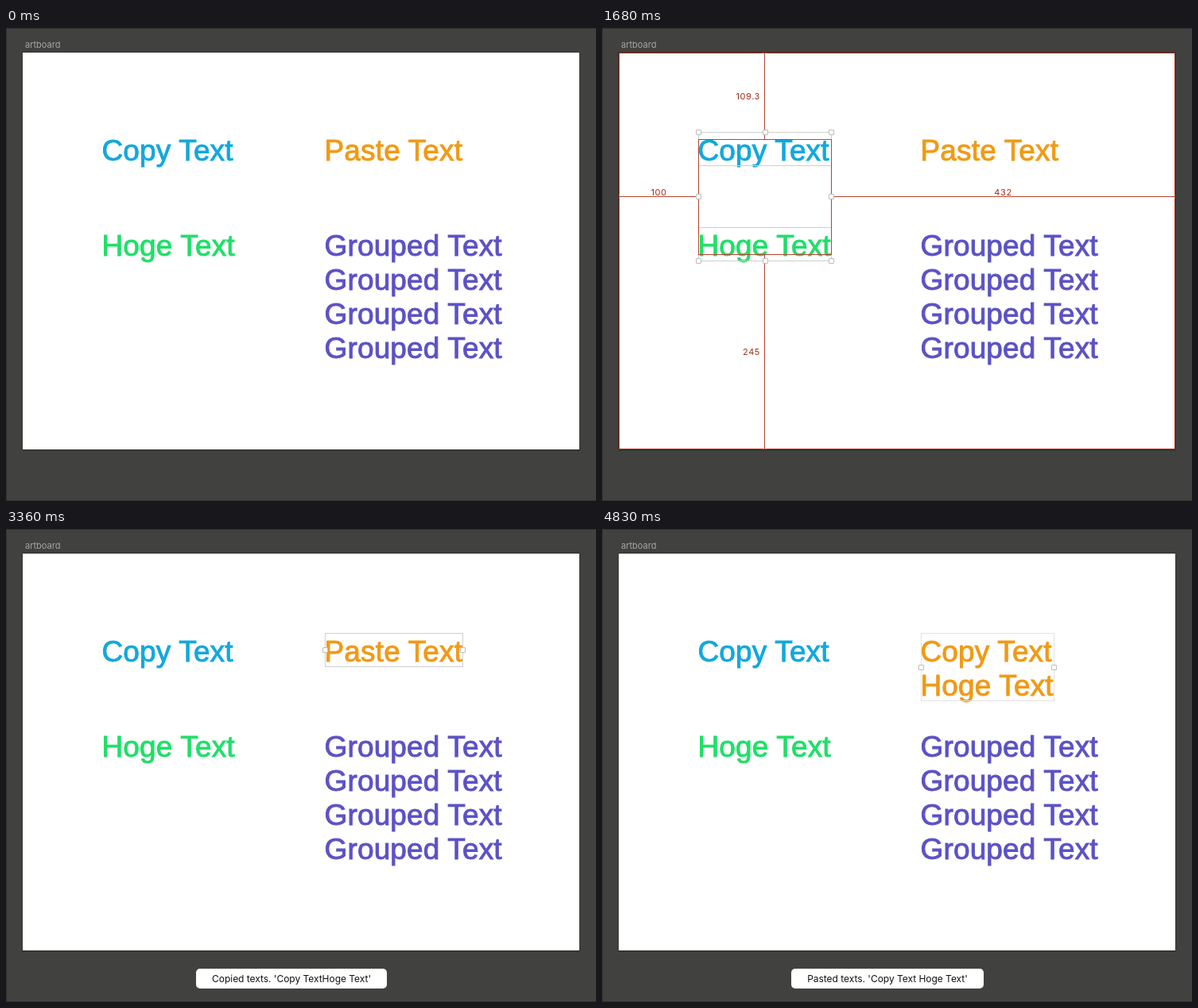
These frames come from a looping animation (742x596 px, 4900 ms). An HTML page:

```html
<!DOCTYPE html>
<html lang="en">
<head>
<meta charset="utf-8">
<style>
  html, body { margin: 0; width: 742px; height: 596px; overflow: hidden; background: #41413f; }
  svg { display: block; }
  text { white-space: pre; }
  .big { font: 37px "Liberation Sans", Arial, sans-serif; letter-spacing: .15px; stroke: currentColor; stroke-width: .95px; fill: currentColor; }
  .label, .measure { font: 11px Inter, sans-serif; }
  .label { fill: #a6a6a4; }
  .measure { fill: #a52a16; letter-spacing: .6px; }
  .toast { font: 12px Inter, sans-serif; letter-spacing: -.03px; fill: #111; text-anchor: middle; }
  .red { stroke: #b5442f; fill: none; }
  .edge { stroke: #a02814; fill: none; }
  .grey { stroke: #cfcfcf; fill: none; }
  .faint { stroke: #e2e2e2; fill: none; }
  .handle { fill: #fff; stroke: #bdbdbd; }
  .marquee { fill: #fff; fill-opacity: .08; stroke: #d2d2d2; }
</style>
</head>
<body>
<svg width="742" height="596" viewBox="0 0 742 596">
  <rect width="742" height="596" fill="#41413f"/>
  <path d="M0 .5H742M.5 0V596M0 595.5H742" stroke="#30302f"/>
  <text class="label" x="24" y="25">artboard</text>
  <rect x="20" y="30" width="702" height="503" fill="#353533"/>
  <rect x="21" y="31" width="700" height="500" fill="#fff"/>
  <g class="big">
    <text x="120.5" y="166.5" color="#13a8dc">Copy Text</text>
    <text x="120.5" y="286.5" color="#20df69">Hoge Text</text>
    <g id="paste"></g>
    <g id="grouped" color="#5c52c5"></g>
  </g>
  <g id="overlay"></g>
</svg>
<script>
const LOOP = 4900, STEP = 70;
const ART = { x0: 21, y0: 31, x1: 720, y1: 530 };
const TIME = {
  dragStart: 280, dragEnd: 770, release: 910,
  copyKeys: 1540, copied: 2030, copyKeysUp: 2170,
  hover: 2800, click: 3080,
  pasteKeys: 3500, pasted: 4060, pasteKeysUp: 4620
};
const $ = id => document.getElementById(id);
const box = (x0, y0, x1, y1) => ({ x0, y0, x1, y1 });
const mid = (a, b) => Math.round((a + b) / 2);

const rect = (b, cls) =>
  `<rect class="${cls}" x="${b.x0 + .5}" y="${b.y0 + .5}" width="${b.x1 - b.x0}" height="${b.y1 - b.y0}"/>`;
const text = (x, y, str, cls = "", extra = "") =>
  `<text class="${cls}" x="${x}" y="${y}" ${extra}>${str}</text>`;
const lines = (x, strings, y) => strings.map((s, i) => text(x, y + 43 * i, s)).join("");
const handle = (x, y) =>
  `<rect class="handle" x="${x - 2.5}" y="${y - 2.5}" width="6" height="6" rx=".5"/>`;

function handles(b, all) {
  const xs = [b.x0, mid(b.x0, b.x1), b.x1], ys = [b.y0, mid(b.y0, b.y1), b.y1];
  let out = "";
  xs.forEach((x, i) => ys.forEach((y, j) => {
    if (all ? i !== 1 || j !== 1 : i !== 1 && j === 1) out += handle(x, y);
  }));
  return out;
}

// Distances from box b to the artboard edges: top, bottom, left, right.
function measure(b, cx, cy, [top, bottom, left, right]) {
  const x = cx + .5, y = cy + .5;
  const tickX = [ART.y0, b.y0, b.y1, ART.y1].map(v => `M${x - 3} ${v + .5}h6`).join("");
  const tickY = [ART.x0, b.x0, b.x1, ART.x1].map(v => `M${v + .5} ${y - 3}v6`).join("");
  const vertical = (a, c, s) => text(cx - 5, (a + c) / 2 + 4.5, s, "measure", 'text-anchor="end"');
  const horizontal = (a, c, s) => text((a + c) / 2 + .5, cy - 1, s, "measure", 'text-anchor="middle"');
  return rect(ART, "edge") + rect(b, "red") +
    `<path class="red" d="M${x} ${ART.y0}V${b.y0}M${x} ${b.y1}V${ART.y1}M${ART.x0} ${y}H${b.x0}M${b.x1} ${y}H${ART.x1}${tickX}${tickY}"/>` +
    vertical(ART.y0, b.y0, top) + vertical(b.y1, ART.y1, bottom) +
    horizontal(ART.x0, b.x0, left) + horizontal(b.x1, ART.x1, right);
}

function toast(str, width, opacity) {
  return `<g opacity="${opacity}"><rect x="${359 - width / 2}" y="554" width="${width}" height="25" rx="5" fill="#fff"/>` +
    text(359, 571, str, "toast") + "</g>";
}

function leftSelection(t) {
  const p = Math.min(1, (t - TIME.dragStart) / (TIME.dragEnd - TIME.dragStart));
  const k = p * p * (3 - 2 * p);
  const drag = box(75, 94, Math.round(75 + 188 * k), Math.round(94 + 293 * k));
  const copy = box(121, 131, 288, 173), hoge = box(121, 251, 288, 293);
  const both = box(121, 131, 288, 293);
  const reaches = b => drag.x1 > b.x0 && drag.y1 > b.y0;
  let out = "", grips = "";
  if (t < TIME.release) out += rect(drag, "marquee");
  if (reaches(hoge)) {
    out += rect(copy, "grey") + rect(hoge, "grey") + rect(both, "grey");
    grips = handles(both, true);
  } else if (reaches(copy)) {
    out += rect(copy, "grey");
    grips = handles(copy, false);
  }
  if (t >= TIME.copyKeys && t < TIME.copyKeysUp)
    out += measure(box(121, 140, 288, 285), 204, 212, ["109.3", "245", "100", "432"]);
  return out + grips;
}

function rightSelection(t) {
  const pasted = t >= TIME.pasted;
  const frame = pasted ? box(401, 131, 568, 216) : box(401, 131, 574, 173);
  let out = rect(frame, pasted ? "faint" : "grey");
  if (t >= TIME.pasteKeys && t < TIME.pasteKeysUp)
    out += pasted
      ? measure(box(401, 140, 568, 208), 484, 174, ["109.3", "322", "380", "152"])
      : measure(frame, 487, 152, ["100", "357", "380", "146"]);
  return out + handles(frame, false);
}

function draw(t) {
  const pasted = t >= TIME.pasted;
  const hovered = t >= TIME.hover && t < TIME.click;
  $("paste").setAttribute("color", hovered ? "#5bc3ef" : "#f09a17");
  $("paste").innerHTML = lines(400.5, pasted ? ["Copy Text", "Hoge Text"] : ["Paste Text"], 166.5);

  let out = "";
  if (t >= TIME.click) out += rightSelection(t);
  else if (t >= TIME.dragStart) out += leftSelection(t);
  if (pasted) out += toast("Pasted texts. 'Copy Text Hoge Text'", 242, 1);
  else if (t >= TIME.copied)
    out += toast("Copied texts. 'Copy TextHoge Text'", 240, Math.min(1, (t - TIME.copied + STEP) / 140));
  $("overlay").innerHTML = out;
}

$("grouped").innerHTML = lines(400.5, Array(4).fill("Grouped Text"), 286.5);
const start = performance.now();
let last = -1;
function tick() {
  const t = Math.floor((performance.now() - start) % LOOP / STEP) * STEP;
  if (t !== last) draw(last = t);
  requestAnimationFrame(tick);
}
tick();
</script>
</body>
</html>
```
